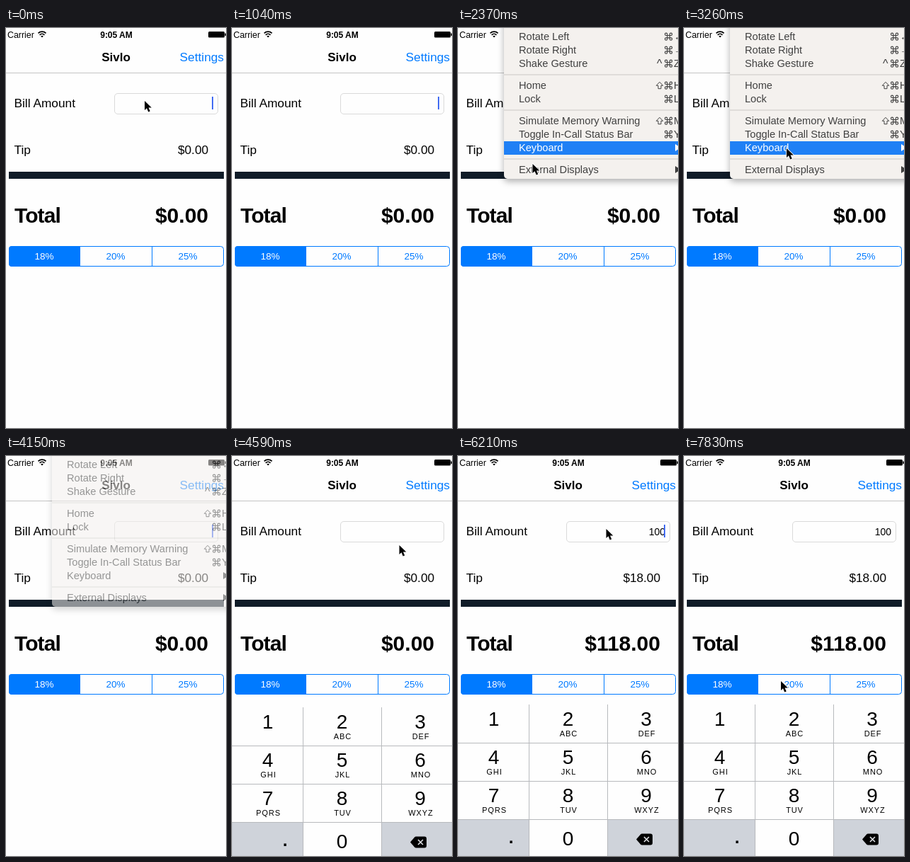
These frames come from a looping animation (311 by 565 pixels, 8 s). An HTML page:

```html
<!DOCTYPE html>
<html lang="en">
<head>
<meta charset="utf-8">
<title>Tip calculator</title>
<style>
  html, body { margin: 0; width: 100%; height: 100%; overflow: hidden; background: #fefefe; }
  svg { display: block; width: 311px; height: 565px; font-family: "Liberation Sans", Arial, sans-serif; }
  text { white-space: pre; }
  .menu { filter: drop-shadow(0 4px 5px rgba(0, 0, 0, .3)); }
</style>
</head>
<body>
<svg id="stage" viewBox="0 0 311 565"></svg>
<script>
const LOOP = 8000;
const BLUE = '#007aff';
const INK = '#404040';

const text = (x, y, size, str, attrs = '') =>
  `<text x="${x}" y="${y}" font-size="${size}" ${attrs}>${str}</text>`;
const rect = (x, y, w, h, fill, attrs = '') =>
  `<rect x="${x}" y="${y}" width="${w}" height="${h}" fill="${fill}" ${attrs}/>`;
const END = 'text-anchor="end"', MID = 'text-anchor="middle"', BOLD = 'font-weight="bold"';

function statusBar() {
  return text(2, 13.5, 12.4, 'Carrier') + text(156, 13.5, 12, '9:05 AM', `${MID} ${BOLD}`) +
    `<g fill="none" stroke="#000" stroke-width="1.7">
      <path d="M45.5 7.3a8 8 0 0 1 11 0M47.6 9.8a5 5 0 0 1 6.8 0"/></g>
     <path d="M49.2 11.6a2.6 2.6 0 0 1 3.6 0L51 13.5z"/>` +
    rect(286, 5, 23, 8.5, '#000', 'rx="1.5"') + rect(309.5, 7.5, 1.5, 3.5, '#000');
}

function segments() {
  return rect(4.5, 308.5, 303, 28, '#fefefe', `rx="4" stroke="${BLUE}"`) +
    `<path d="M105 308v29H8a4 4 0 0 1-4-4V312a4 4 0 0 1 4-4z" fill="${BLUE}"/>` +
    `<path d="M206.5 308v29" stroke="${BLUE}"/>` +
    ['18%', '20%', '25%'].map((label, i) =>
      text([54, 155, 257][i], 327, 13.5, label, `${MID} fill="${i ? BLUE : '#fff'}"`)).join('');
}

function form() {
  return rect(0, 63, 311, 1, '#c4c4c4') +
    text(155.5, 47, 17, 'Sivlo', `${MID} ${BOLD}`) +
    text(308, 47, 17.3, 'Settings', `${END} fill="${BLUE}"`) +
    text(11.5, 112, 17.3, 'Bill Amount') + text(11.5, 178, 17.3, 'Tip') +
    rect(153.5, 92.5, 146, 29, '#fefefe', 'rx="4.5" stroke="#dadada"') +
    rect(4, 203, 304, 10, '#101c28') +
    text(12, 275, 30, 'Total', `${BOLD} letter-spacing="-.9"`) +
    text(293, 111.5, 14, '', `${END} id="bill"`) +
    text(286, 178, 17.2, '', `${END} id="tip"`) +
    text(286, 275, 30, '', `${END} ${BOLD} id="total"`) +
    rect(291, 97, 2, 18, '#426bf2', 'id="caret"');
}

function keypad() {
  const letters = ['', 'ABC', 'DEF', 'GHI', 'JKL', 'MNO', 'PQRS', 'TUV', 'WXYZ'];
  const centers = [50.5, 155.5, 266];
  const keys = letters.map((label, i) => {
    const x = centers[i % 3], y = 381 + 54 * Math.floor(i / 3);
    return text(x, y, 28, i + 1, MID) + text(x + 1, y + 15, 11, label, `${MID} letter-spacing=".9"`);
  }).join('');
  return rect(0, 351, 311, 218, '#fefefe') +
    rect(0, 513, 100, 56, '#cfd3da') + rect(212, 513, 99, 56, '#cfd3da') +
    `<path d="M100.5 351v218M211.5 351v218M0 405.5h311M0 459.5h311M0 513.5h311" stroke="#b8babd"/>` +
    keys + text(155.5, 550, 28, '0', MID) + text(75, 547, 24, '.', `${MID} ${BOLD}`) +
    `<path d="M252 541.5l6-7q1-1 2-1h12q3 0 3 3v10q0 3-3 3h-12q-1 0-2-1z"/>
     <path d="M263 538l7 7m0-7l-7 7" stroke="#e4e6ea" stroke-width="1.5"/>`;
}

// Shortcut whose command sign starts at x; mod is '^', 'shift' or ''.
function shortcut(x, y, mod, key) {
  const shift = `<path transform="translate(${x - 13} ${y - 10.5})" d="M6 .8l4.7 5H8v4.4H4V5.8H1.3z"
    fill="none" stroke="currentColor"/>`;
  return (mod === 'shift' ? shift : text(x - 11, y + 1, 16, mod)) +
    `<path transform="translate(${x - .6} ${y - 11}) scale(1.13)" fill="none" stroke="currentColor"
      d="M4 4H2.5A1.5 1.5 0 1 1 4 2.5V8.5A1.5 1.5 0 1 1 2.5 7H8.5A1.5 1.5 0 1 1 7 8.5V2.5A1.5 1.5 0 1 1 8.5 4Z"/>` +
    text(x + 13, y, 14.6, key);
}

function menu(id, x, width, bottom, rules, items, highlight = '') {
  return `<g id="${id}" class="menu" fill="${INK}" color="${INK}">` +
    rect(x, -20, width, bottom + 20, '#f4f1ee', 'rx="5"') +
    rules.map(y => rect(x, y, width, 2, '#dfdcd9')).join('') + highlight +
    items.map(([label, y, extra = '', attrs = '']) =>
      `<g ${attrs}>${text(x + 21, y, 14.6, label)}${extra}</g>`).join('') + '</g>';
}

function editMenu() {
  const dim = 'fill="#b9b6b4" color="#b9b6b4"';
  return menu('edit', 21, 249, 152, [14, 103], [
    ['Redo', 5, shortcut(231, 5, 'shift', 'Z'), dim],
    ['Cut', 36, shortcut(231, 36, '', 'X'), dim],
    ['Copy', 55, shortcut(231, 55, '', 'C')],
    ['Copy Screen', 74, shortcut(231, 74, '^', 'C')],
    ['Paste', 93, shortcut(231, 93, '', 'V')],
    ['Start Dictation…', 124, text(255, 124, 12.4, 'fn fn', END)],
    ['Special Characters…', 143, shortcut(212, 143, '^', 'Space')],
  ]);
}

function hardwareMenu() {
  const key = (label, y, mod, char) => [label, y, shortcut(292, y, mod, char)];
  const submenu = (label, y) =>
    [label, y, `<path d="M307 ${y - 10}v10l8-5z"/>`, `id="${label.split(' ')[0]}"`];
  return menu('hardware', 65, 270, 213, [65, 115, 184], [
    key('Rotate Left', 17, '', '←'),
    key('Rotate Right', 36, '', '→'),
    key('Shake Gesture', 55, '^', 'Z'),
    key('Home', 86, 'shift', 'H'),
    key('Lock', 105, '', 'L'),
    key('Simulate Memory Warning', 136, 'shift', 'M'),
    key('Toggle In-Call Status Bar', 155, '', 'Y'),
    submenu('Keyboard', 174),
    submenu('External Displays', 205),
  ], rect(65, 160, 270, 19, '#1f80f5', 'id="highlight"'));
}

const stage = document.getElementById('stage');
stage.innerHTML = rect(0, 0, 311, 565, '#fefefe') + statusBar() + form() + segments() +
  `<g id="keypad">${keypad()}</g>` + editMenu() + hardwareMenu() +
  `<path id="cursor" d="M0 0v13l3-2.7 2.2 5.2 2.5-1-2.2-5h4.3z" stroke="#fff" stroke-width="1.6" paint-order="stroke"/>`;
const part = id => document.getElementById(id);

// Each track lists [start, ...values]; a value holds until the next start.
const tracks = {
  frames: [[0], [4290], [4440], [4590], [4730]],
  caret: [[0, 1], [450, .5], [600, 0], [890, .5], [1040, 1], [1330, .5], [1480, 0], [1780, 1],
    [4440, .5], [4590, 0], [4880, .5], [5030, 1], [5470, .5], [5620, 0], [5920, 1],
    [6810, .5], [6960, 0], [7250, .5], [7390, 1], [7690, .5], [7830, 0]],
  cursor: [[0, 196, 103], [450, 155, 63], [600], [2370, 105.5, 192], [2520, 110, 211],
    [2660, 114, 203], [2810, 122, 180], [2960, 127, 170], [3260, 145, 170], [3410],
    [4440, 278, 160], [4590, 236.5, 126], [4730, 215, 109], [4880, 209.5, 103],
    [7390, 202, 122], [7540, 165, 220], [7690, 135, 300], [7830, 137, 318]],
  menu: [[0, ''], [1630, 'edit', 1], [1780, 'hardware', 1], [4150, 'hardware', .55], [4290, '']],
  highlight: [[0, ''], [2370, 'Keyboard'], [2520, 'External'], [2810, 'Keyboard'], [4150, '']],
  bill: [[0, 0], [5920, 1], [6070, 10], [6210, 100]],
};
const at = (name, t) => tracks[name].findLast(([start]) => start <= t);

// Critically damped slide of the keypad from below the stage.
function keypadOffset(t) {
  if (t < 4290) return 216;
  const s = 18.3 * (t - 4272) / 1000;
  return Math.round(216 * (1 + s) * Math.exp(-s));
}

function draw(t) {
  const [, bill] = at('bill', t);
  part('bill').textContent = bill || '';
  part('tip').textContent = '$' + (bill * .18).toFixed(2);
  part('total').textContent = '$' + (bill * 1.18).toFixed(2);
  part('caret').setAttribute('opacity', at('caret', t)[1]);

  const step = at('frames', t)[0];
  part('keypad').setAttribute('transform', `translate(0 ${step === 4730 ? 0 : keypadOffset(step)})`);

  const [, open, opacity] = at('menu', t);
  for (const id of ['edit', 'hardware']) {
    part(id).style.display = id === open ? '' : 'none';
    part(id).setAttribute('opacity', opacity ?? 1);
  }
  const [, active] = at('highlight', t);
  part('highlight').style.display = active ? '' : 'none';
  part('highlight').setAttribute('y', active === 'External' ? 191 : 160);
  for (const id of ['Keyboard', 'External']) part(id).setAttribute('fill', id === active ? '#fff' : INK);

  const [, x, y] = at('cursor', t);
  part('cursor').style.display = x === undefined ? 'none' : '';
  if (x !== undefined) part('cursor').setAttribute('transform', `translate(${x} ${y})`);
}

const begin = performance.now();
function tick() {
  draw((performance.now() - begin) % LOOP);
  requestAnimationFrame(tick);
}
tick();
</script>
</body>
</html>
```
